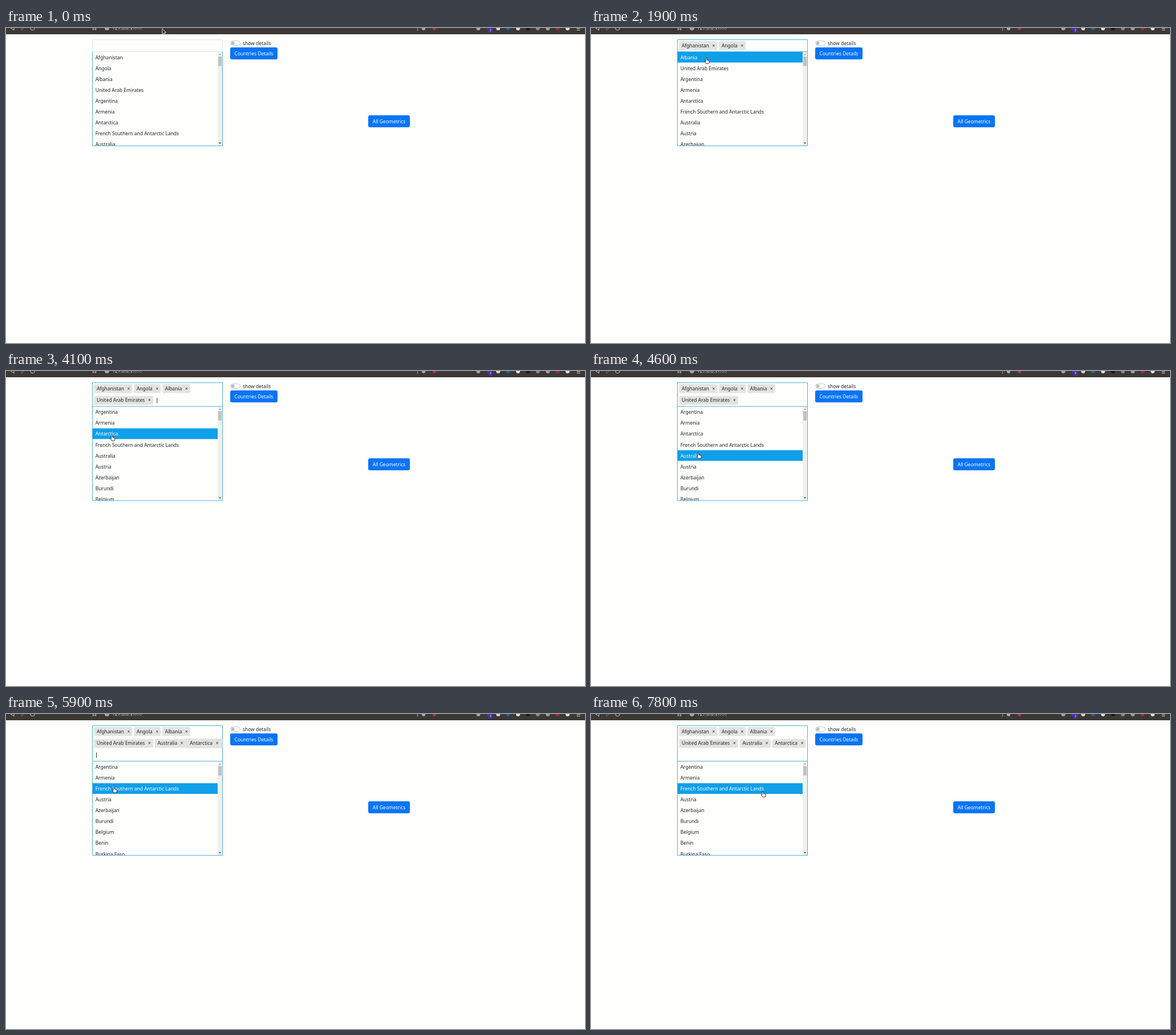
Animation of 1015x552 px, one loop 8000 ms. Source, as an HTML page with a canvas:

```html
<!DOCTYPE html>
<html lang="en">
<head>
<meta charset="utf-8">
<title>Country picker</title>
<style>
html, body { margin: 0; width: 100%; height: 100%; overflow: hidden; background: #fefffc; }
canvas { display: block; }
</style>
</head>
<body>
<canvas id="stage" width="1015" height="552"></canvas>
<script>
const ctx = document.getElementById('stage').getContext('2d');
const LOOP = 8000, TICK = 100;
const FONT = '8.46px "Noto Sans", "Open Sans", sans-serif';
const BLUE = '#3ca7d2', GREY = '#dde1df', INK = '#212529', PAGE = '#fefffc';
const LEFT = 151.5, RIGHT = 379.5, TOP = 20.5;
const ROW = 19.08, LINE = 20.6, LIST_H = 165;

const countries = ['Afghanistan', 'Angola', 'Albania', 'United Arab Emirates', 'Argentina',
  'Armenia', 'Antarctica', 'French Southern and Antarctic Lands', 'Australia', 'Austria',
  'Azerbaijan', 'Burundi', 'Belgium', 'Benin', 'Burkina Faso'];

const picks = [
  { name: 'Afghanistan', at: 900 }, { name: 'Angola', at: 1900 },
  { name: 'Albania', at: 2600 }, { name: 'United Arab Emirates', at: 3600 },
  { name: 'Australia', at: 4900 }, { name: 'Antarctica', at: 5900, pop: [1.1, 1.1] }
];
const POP = [1, 1.2, 1.1];

// Pointer moves: start, duration, end x, end y
const moves = [
  [100, 500, 204, 53], [1500, 100, 202, 52], [3100, 200, 194, 59], [3300, 100, 194, 66],
  [3600, 500, 185.5, 112], [4100, 400, 188, 143], [4900, 300, 189, 139],
  [5300, 100, 189, 127.5], [6400, 500, 451, 129], [7100, 400, 307, 135], [7600, 200, 301, 135]
];

function pointer(t) {
  let x = 274, y = 1;
  for (const [start, span, toX, toY] of moves) {
    const k = Math.min(1, Math.max(0, (t - start) / span));
    const ease = k * k * (3 - 2 * k);
    x += (toX - x) * ease;
    y += (toY - y) * ease;
  }
  return { x, y };
}

// Flow the chips into lines, as wide as their text
function layoutChips() {
  let left = 154.5, line = 0;
  for (const c of picks) {
    const w = ctx.measureText(c.name).width + 19;
    if (left + w > RIGHT) { left = 154.5; line++; }
    Object.assign(c, { left, line, w });
    left += w + 3;
  }
}

function box(x, y, w, h, color, r = 0) {
  ctx.fillStyle = color;
  ctx.beginPath();
  ctx.roundRect(x, y, w, h, r);
  ctx.fill();
}

function dot(x, y, r, color) {
  ctx.fillStyle = color;
  ctx.beginPath();
  ctx.arc(x, y, r, 0, Math.PI * 2);
  ctx.fill();
}

function shape(points, fill, edge) {
  ctx.beginPath();
  points.forEach(([x, y]) => ctx.lineTo(x, y));
  ctx.closePath();
  if (fill) { ctx.fillStyle = fill; ctx.fill(); }
  if (edge) { ctx.strokeStyle = edge; ctx.stroke(); }
}

function stroke(color, ...points) {
  ctx.strokeStyle = color;
  ctx.beginPath();
  points.forEach(([x, y]) => ctx.lineTo(x, y));
  ctx.stroke();
}

function label(s, x, mid, color = INK, align = 'left') {
  ctx.fillStyle = color;
  ctx.textAlign = align;
  ctx.fillText(s, x, Math.round(mid + 3));
}

function browserBar() {
  box(0, 0, 1015, 11, '#3b3836');
  ctx.lineWidth = 1;
  stroke('#d0cecc', [8, 0], [14, 4], [14, 0]);
  stroke('#75726f', [32, 0], [27, 4], [27, 0]);
  ctx.strokeStyle = '#d0cecc';
  ctx.beginPath();
  ctx.arc(46.5, 0, 3.8, 0, Math.PI);
  ctx.stroke();
  stroke('#d0cecc', [152.5, 0], [152.5, 3.5], [155, 1.5], [157.5, 3.5], [157.5, 0]);
  dot(177, 0, 4, '#aaa8a6');
  label('127.0.0.1', 186, 0, '#e4e2e0');
  label(':8000', 217, 0, '#92908e');
  box(721, 0, 1, 5, '#a5a3a1');
  dot(732, 1, 3, '#a9abb5');
  dot(751, 1, 3, '#b7344f');
  ['#aaa3a1', '#4b2fa8', '#dad8d6', '#2364a3', '#e2e0de', '#171717', '#8b8987',
    '#a3a19f', '#a22d39', '#ebe9e7'].forEach((c, i) => dot(828 + i * 17.4, 0.5, 3.5, c));
  box(845.5, 0, 7.5, 8, '#4b2fa8', 1.5);
  ctx.font = '6px "Noto Sans", sans-serif';
  label('7', 849.3, 3, '#fff', 'center');
  ctx.font = FONT;
  for (const y of [0, 3]) box(1000.5, y, 6, 1, '#dfdddb');
}

function button(s, x, y, w) {
  box(x, y, w, 21, '#0874f5', 3);
  label(s, x + w / 2, y + 10.5, '#fff', 'center');
}

function sidePanel() {
  ctx.lineWidth = 0.8;
  ctx.strokeStyle = '#b9bab9';
  ctx.beginPath();
  ctx.roundRect(393.5, 22.5, 17, 8, 4);
  ctx.stroke();
  dot(397.7, 26.5, 2.9, '#bbbcbb');
  label('show details', 415, 26.5);
  button('Countries Details', 393, 34, 83);
  button('All Geometrics', 635, 153, 73);
}

function scrollbar(top) {
  const caret = (y, d, color) => shape([[375, y], [377.2, y + d], [372.8, y + d]], color);
  box(371, top, 8, LIST_H, '#f0f1ef');
  box(372, top + 8.5, 6, 16.5, '#c1c2c0');
  caret(top + 3.5, 2.5, '#a0a19f');
  caret(top + LIST_H - 3.3, -2.5, '#454545');
}

function dropdown(items, top, hover) {
  ctx.save();
  ctx.beginPath();
  ctx.rect(LEFT, top, RIGHT - LEFT, LIST_H);
  ctx.clip();
  items.slice(0, 9).forEach((name, i) => {
    const y = top + 0.3 + i * ROW;
    if (i === hover) box(152, y, 219, ROW - 0.3, '#109fe9');
    label(name, 156.7, y + 9.9, i === hover ? '#fff' : INK);
  });
  scrollbar(top);
  ctx.restore();
}

// Input and list share one divider
function borders(top, focused) {
  const end = top + LIST_H, edge = focused ? BLUE : GREY;
  ctx.lineWidth = 0.9;
  stroke(edge, [LEFT, top], [LEFT, TOP], [RIGHT, TOP], [RIGHT, top], [LEFT, top]);
  stroke(BLUE, [LEFT, top], [LEFT, end], [RIGHT, end], [RIGHT, top]);
}

function drawChip(c, t) {
  const s = (c.pop || POP)[(t - c.at) / TICK] || 1;
  const mid = 30.8 + c.line * LINE, w = c.w * s, h = 15.5 * s;
  box(c.left + (c.w - w) / 2, mid - h / 2, w, h, '#e3e4e2', 1.5);
  label(c.name, c.left + 4.5, mid);
  label('×', c.left + c.w - 6.5, mid, INK, 'center');
}

function hand(x, y) {
  ctx.lineWidth = 0.9;
  shape([[x - 1, y + 0.8], [x, y], [x + 1, y + 0.8], [x + 1, y + 4], [x + 5, y + 5],
    [x + 5.4, y + 8], [x + 4.5, y + 10.4], [x, y + 10.4], [x - 2.7, y + 6.3],
    [x - 1, y + 6.5]], '#fff', '#222');
}

function arrow(x, y) {
  ctx.lineWidth = 0.9;
  shape([[x, y], [x, y + 9.5], [x + 2.2, y + 7.5], [x + 3.8, y + 11], [x + 5.3, y + 10.3],
    [x + 3.8, y + 7], [x + 6.6, y + 7]], '#222', '#eee');
}

function beam(x, y) {
  box(x - 0.5, y - 4, 1, 8, '#333');
  for (const end of [-4.3, 3.5]) box(x - 2.2, y + end, 4.4, 0.9, '#333');
}

function draw(now) {
  const t = Math.floor((now % LOOP) / TICK) * TICK;
  ctx.font = FONT;
  layoutChips();
  const picked = picks.filter(c => t >= c.at);
  const items = countries.filter(n => !picked.some(c => c.name === n));

  // The text field follows the last chip, or wraps when little room is left
  const last = picked[picked.length - 1];
  const end = last ? last.left + last.w : LEFT;
  const wraps = end > 300;
  const line = last ? last.line + wraps : 0;
  const top = 41.5 + line * LINE;

  const p = pointer(t);
  const within = (right, y0, y1) => p.x > 152 && p.x < right && p.y > y0 && p.y < y1;
  const overList = within(371, top, top + LIST_H);
  const hover = overList ? Math.floor((p.y - top - 0.3) / ROW) : -1;
  const cursor = overList ? hand : within(380, TOP, top) ? beam : arrow;

  box(0, 0, 1015, 552, PAGE);
  browserBar();
  sidePanel();
  dropdown(items, top, hover);
  borders(top, t >= 800);
  picked.forEach(c => drawChip(c, t));

  const phase = line ? 900 : 100;
  if (last && (t - phase) % 1000 < 500) {
    box((wraps ? LEFT : end) + 6.5, 26.3 + line * LINE, 1, 9.5, '#333');
  }
  cursor(p.x, p.y);
}

const start = performance.now();
function loop() {
  draw(performance.now() - start);
  requestAnimationFrame(loop);
}
loop();
</script>
</body>
</html>
```
